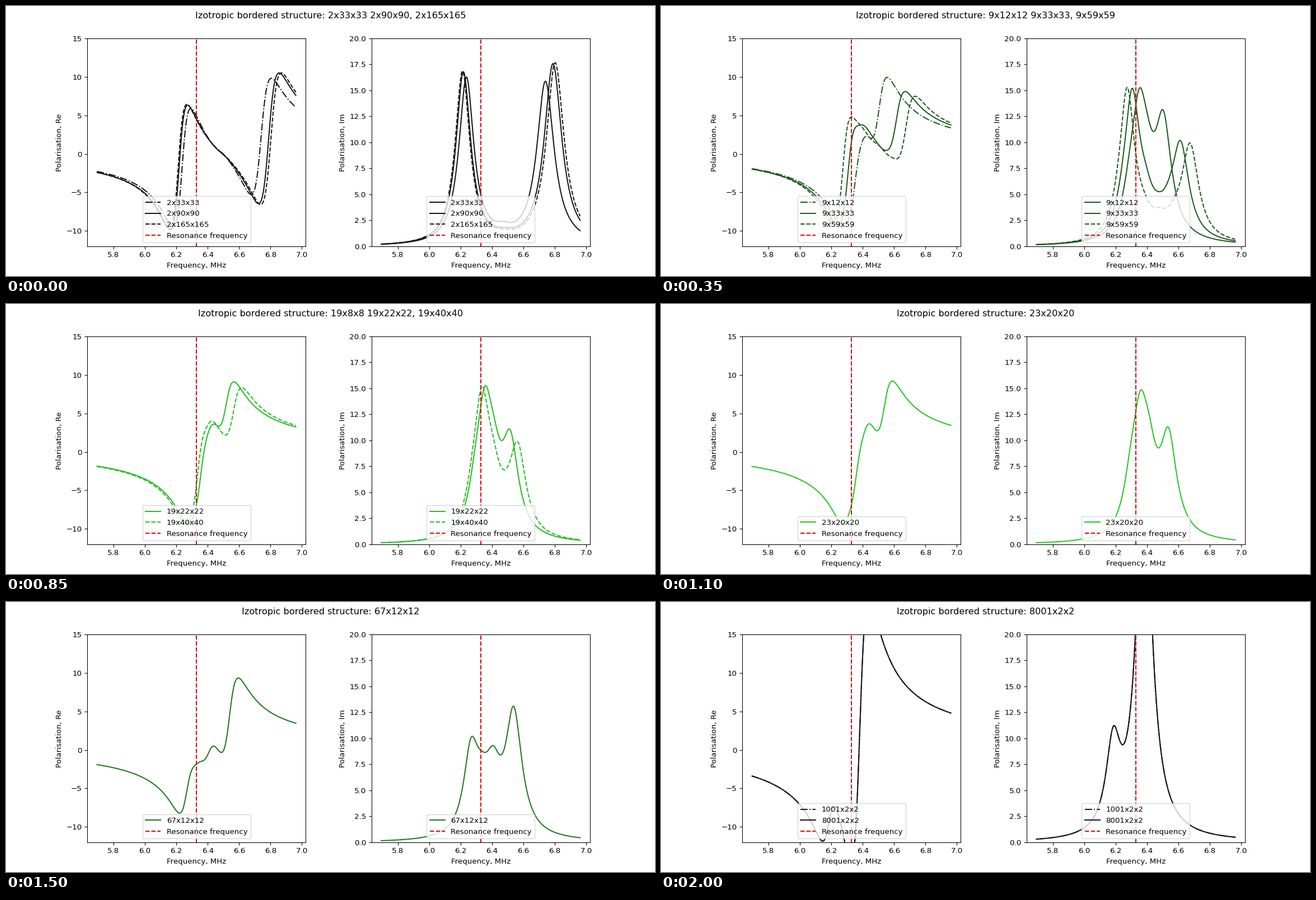
Recreate the animation shown at these times as a matplotlib script. Size 1159 by 483 pixels, loop 2050 ms.

```python
import numpy as np
import matplotlib.pyplot as plt
from matplotlib.animation import FuncAnimation

F0 = 6.3285          # resonance frequency
GAMMA = 0.117        # damping of a single mode
FRAMES = 41
SMALL, MEDIUM, LARGE = 10**3, 20**3, 30**3   # inner cells of a structure
f = np.linspace(0.9 * F0, 1.1 * F0, 400)


def mode(x, fj):
    """Resonance of unit height centred at fj."""
    width = GAMMA * (fj / F0) ** 2
    return width / fj * x**2 / (x**2 - fj**2 - 1j * x * width)


def shoulder(peak, valley, share, reach):
    """Level halfway between a valley and a peak; sags when they lie far apart."""
    gap = abs(peak[0] - valley[0])
    rise = share * np.exp(-(gap / reach) ** 2)
    return np.array([(peak[0] + valley[0]) / 2,
                     valley[1] + rise * (peak[1] - valley[1])])


def absorption_levels(nx, n):
    """Points (frequency, Im) that shape the curve of an nx x n x n structure."""
    s, u = nx / n, 1 / n
    solid = np.tanh(1.9 * s)
    sheet = np.exp(-(s / 0.09) ** 2)

    # Slabs and cubes: a low peak, a valley and a high peak.
    low = np.array([6.205 + 0.155 * (1 - np.exp(-s / 0.26)), 15.2 + 1.7 * sheet])
    valley = np.array([6.485 - 0.4 * u, 1.5 + 7.9 * solid])
    flank = np.array([low[0] - 0.058, low[1] * (0.485 + 0.17 * solid)])
    slab = np.array([flank, low, shoulder(low, valley, 1.0, 0.15), valley])

    # Rods: the low peak splits in two, and all drifts down as the rod thins.
    root = np.sqrt(u)
    rod = np.array([(6.271 - 0.172 * u, 9.9 + 2.5 * u),
                    (6.352 - 0.274 * u, 6.4 + 7.0 * u),
                    (6.520 - 0.390 * root, 8.0 + 2.0 * u),
                    (6.550 - 0.340 * root, 7.4 + 30 * u**2)])
    stretch = 1 - np.exp(-max(0, s - 1) / 3)
    body = slab + stretch * (rod - slab)

    cube_dip = 0.04 * np.exp(-((s - 0.8) / 0.35) ** 2)
    high = np.array([6.57 - 0.378 * u + 0.25 * np.exp(-s / 0.19) - cube_dip,
                     8.5 + 55 * u + 9 * sheet])
    return np.vstack([body, shoulder(high, body[-1], 0.5, 0.19), high])


def polarisation(nx, n):
    """Sum of non-negative modes that meets the absorption levels."""
    pos, height = absorption_levels(nx, n).T
    mix = mode(pos[:, None], pos[None, :]).imag
    amp = np.zeros(len(pos))
    for _ in range(150):
        for j in range(len(pos)):
            rest = mix[j] @ amp - mix[j, j] * amp[j]
            amp[j] = max(0.0, (height[j] - rest) / mix[j, j])
    return mode(f[:, None], pos[None, :]) @ amp


def slab_size(nx, cells):
    return nx, round((cells / (nx - 1)) ** 0.5) + 1


def rod_size(n, cells):
    return cells // (n - 1) ** 2 + 1, n


def name(size):
    nx, n = size
    return f"{nx}x{n}x{n}"


def scene(k):
    """Title sizes and curves as (size, style of Re, style of Im)."""
    if k < 20:
        nx = k + 2
        small, medium, large = (slab_size(nx, c) for c in (SMALL, MEDIUM, LARGE))
        sizes = f"{name(small)} {name(medium)}, {name(large)}"
        curves = [(small, "-.", "-")] if nx <= 11 else []
        return sizes, curves + [(medium, "-", "-"), (large, "--", "--")]

    n = 42 - k
    medium = rod_size(n, MEDIUM)
    curves = [(rod_size(n, SMALL), "-.", "-.")] if n <= 11 else []
    return name(medium), curves + [(medium, "-", "-")]


# A 12 x 5 inch sheet scaled to 1159 x 483 pixels.
dpi = 1159 / 12
fig, (ax_re, ax_im) = plt.subplots(1, 2, figsize=(1159 / dpi, 483 / dpi), dpi=dpi)
fig.subplots_adjust(left=0.125, right=0.9, bottom=0.11, top=0.88, wspace=0.3)
title = fig.suptitle("")


def draw(k):
    sizes, curves = scene(k)
    title.set_text(f"Izotropic bordered structure: {sizes}")
    t = 1 - abs(k - 20) / 20
    color = (0.1 + 0.04 * t, 0.08 + 0.78 * t, 0.1 + 0.04 * t)

    for ax in (ax_re, ax_im):
        ax.clear()
    for size, re_style, im_style in curves:
        values = polarisation(*size)
        ax_re.plot(f, values.real, re_style, color=color, label=name(size))
        ax_im.plot(f, values.imag, im_style, color=color, label=name(size))

    for ax, part, span in ((ax_re, "Re", (-12, 15)), (ax_im, "Im", (0, 20))):
        ax.axvline(F0, color="#d00a10", ls="--", label="Resonance frequency")
        ax.set_xlim(0.89 * F0, 1.11 * F0)
        ax.set_ylim(*span)
        ax.set_xlabel("Frequency, MHz")
        ax.set_ylabel(f"Polarisation, {part}")
        ax.legend(loc="lower center")
    return []


anim = FuncAnimation(fig, draw, frames=FRAMES, interval=50, repeat=True, blit=False)
plt.show()
```
